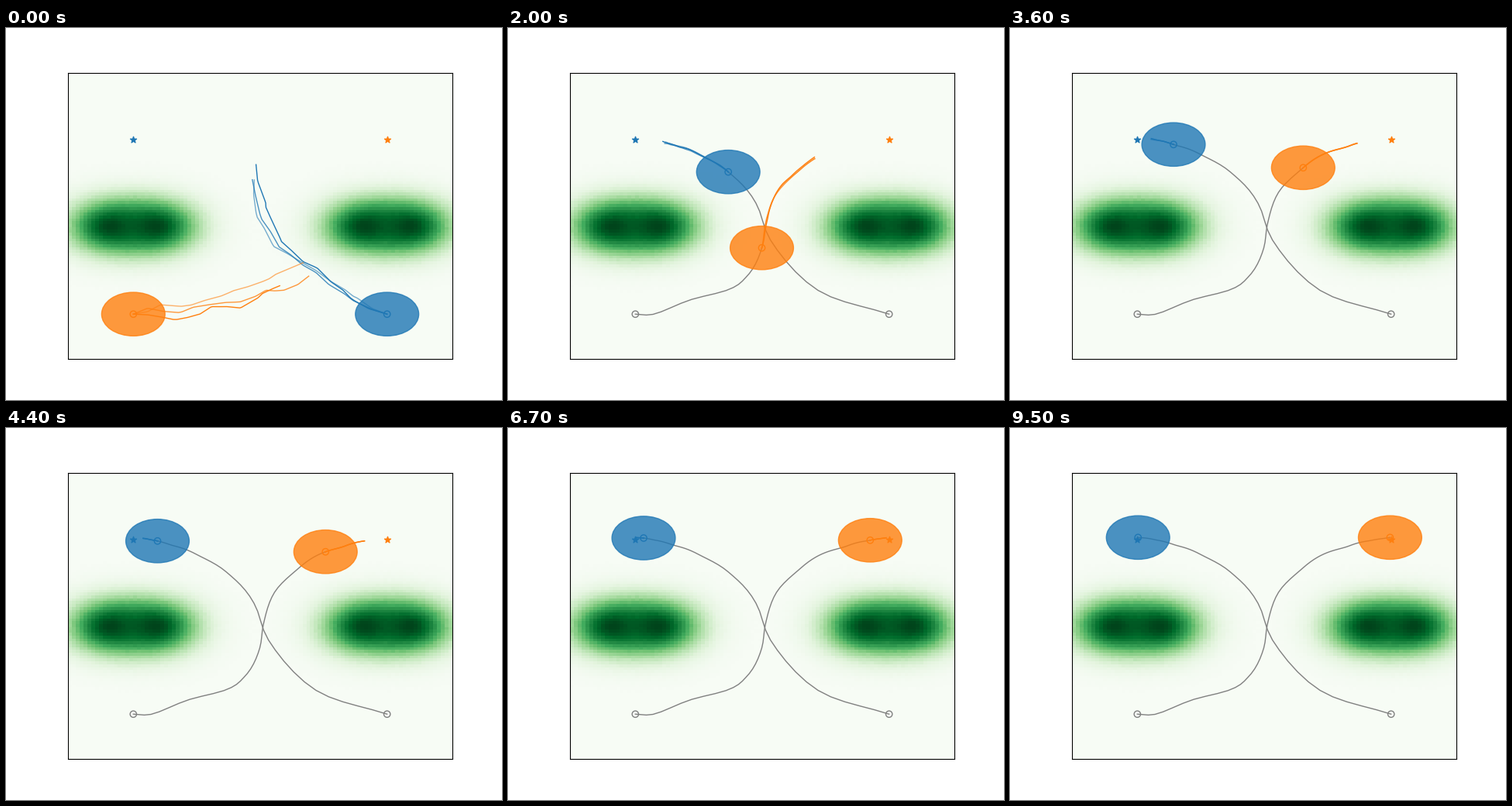
A matplotlib script for the animation above (9600 ms loop, 640 px wide and 480 px high).

```python
import numpy as np
import matplotlib.pyplot as plt
from matplotlib.animation import FuncAnimation
from matplotlib.patches import Ellipse

FRAMES, INTERVAL = 96, 100
SAMPLES = 90          # vertices per plan line
LEFT, RIGHT, TOP, BOTTOM = 80, 576, 57.6, 427.2
ALPHAS = (0.6, 0.8, 1.0)

# Key poses (step, x, y) and the rough first plan of each robot
BLUE_WAY = [
    (0, 491.7, 369.2), (5, 400, 338.5), (10, 338.6, 273.5), (13.6, 322, 230),
    (20, 284.2, 185.7), (26, 246, 163.2), (36, 211, 150.3), (52, 186.4, 144),
    (67, 175, 142), (80, 167.2, 141.5), (95, 165.2, 141.3)]
BLUE_FIRST = [(491.7, 369.2), (445, 347), (394, 309), (345, 277), (325, 240), (318, 190)]

ORANGE_WAY = [
    (0, 164.3, 369.2), (3, 187, 369.5), (7, 237, 350.2), (10, 281.2, 338.8),
    (14.5, 309, 319.5), (20, 327.5, 283.7), (24, 332, 254), (30, 346.5, 212),
    (36, 378.3, 180.3), (52, 438, 152), (67, 467.3, 144.8), (80, 484, 142.2),
    (95, 490.4, 141.3)]
ORANGE_FIRST = [(164.3, 369.2), (222, 364), (280, 349), (330, 335), (370, 314)]


def make_path(way):
    """Smooth position as a function of the step."""
    way = np.array(way, float)
    times, pts = way[:, 0], way[:, 1:]
    slopes = np.gradient(pts, times, axis=0)

    def path(t):
        t = np.clip(np.atleast_1d(t).astype(float), times[0], times[-1])
        k = np.clip(np.searchsorted(times, t, side="right") - 1, 0, len(times) - 2)
        h = (times[k + 1] - times[k])[:, None]
        u = (t - times[k])[:, None] / h
        return ((1 + 2 * u) * (1 - u) ** 2 * pts[k] + u * (1 - u) ** 2 * h * slopes[k]
                + u * u * (3 - 2 * u) * pts[k + 1] + u * u * (u - 1) * h * slopes[k + 1])

    return path


def resample(points):
    """Offsets from the first point, evenly spaced along the line."""
    p = np.array(points, float)
    s = np.r_[0, np.cumsum(np.hypot(*np.diff(p, axis=0).T))]
    at = np.linspace(0, s[-1], SAMPLES)
    return np.column_stack([np.interp(at, s, p[:, i]) for i in (0, 1)]) - p[0]


def wobble(seed, step, knots=12):
    """Random walk away from the plan that fades as the steps go by."""
    moves = np.random.default_rng(seed).normal(0, 3 * np.exp(-step / 10), (knots, 2))
    walk = np.vstack([[0, 0], moves.cumsum(axis=0)])
    at = np.linspace(0, knots, SAMPLES)
    return np.column_stack([np.interp(at, range(knots + 1), walk[:, i]) for i in (0, 1)])


class Robot:
    def __init__(self, ax, way, first, color, goal, seed):
        self.path, self.seed, self.first = make_path(way), seed, resample(first)
        self.track = self.path(np.arange(FRAMES))
        start = self.track[0]
        ax.scatter(*goal, marker="*", color=color, zorder=2)
        self.origin = ax.scatter(*start, edgecolors="gray", facecolors="none", zorder=2)
        self.trail, = ax.plot([], [], color="gray", lw=1, zorder=2)
        self.body = ax.add_patch(Ellipse(start, 81.8, 56.3, color=color, alpha=0.8, zorder=3))
        self.lines = [ax.plot([], [], color=color, lw=1, alpha=a, zorder=4)[0] for a in ALPHAS]
        self.dot = ax.scatter(*start, edgecolors=color, facecolors="none", zorder=4)

    def plan(self, step, n):
        pos = self.track[step]
        horizon = np.clip(12 + 0.8 * (step - 10), 12, 20)
        ahead = self.path(np.linspace(step, step + horizon, SAMPLES)) - pos
        early = max(1 - step / 10, 0) ** 2
        shape = early * self.first + (1 - early) * ahead
        return pos + shape + wobble((self.seed, n, step), step)

    def update(self, step):
        pos = self.track[step]
        self.origin.set_visible(step > 0)
        self.trail.set_data(*self.track[:step + 1].T)
        self.body.center = pos
        self.dot.set_offsets(pos)
        for n, line in enumerate(self.lines):
            line.set_data(*self.plan(step, n).T)


def risk_map(n=100):
    """Noisy chance of hitting one of four soft obstacles."""
    x = LEFT + (np.arange(n) + 0.5) * (RIGHT - LEFT) / n
    y = TOP + (np.arange(n) + 0.5) * (BOTTOM - TOP) / n
    gx, gy = np.meshgrid(x, y)
    free = np.ones((n, n))
    for cx in (135, 193, 463, 521):
        free *= 1 - np.exp(-((gx - cx) / 38) ** 2 / 2 - ((gy - 256.5) / 24) ** 2 / 2)
    p = 1 - free
    noise = np.random.default_rng(4).normal(0, 0.015, (n, n))
    return np.clip(p + noise * np.sqrt(p * (1 - p)), 0, 1)


fig = plt.figure(figsize=(6.4, 4.8), dpi=100)
ax = fig.add_axes([0.125, 0.11, 0.775, 0.77])
ax.imshow(risk_map(), cmap="Greens", vmin=0, vmax=1, aspect="auto",
          interpolation="nearest", extent=(LEFT, RIGHT, BOTTOM, TOP))
ax.set(xlim=(LEFT, RIGHT), ylim=(BOTTOM, TOP), xticks=[], yticks=[])

robots = [Robot(ax, BLUE_WAY, BLUE_FIRST, "C0", (164.3, 144), 1),
          Robot(ax, ORANGE_WAY, ORANGE_FIRST, "C1", (491.7, 144), 2)]


def update(step):
    for robot in robots:
        robot.update(step)
    return []


anim = FuncAnimation(fig, update, frames=FRAMES, interval=INTERVAL,
                     init_func=lambda: update(0), repeat=True, repeat_delay=0)
plt.show()
```
